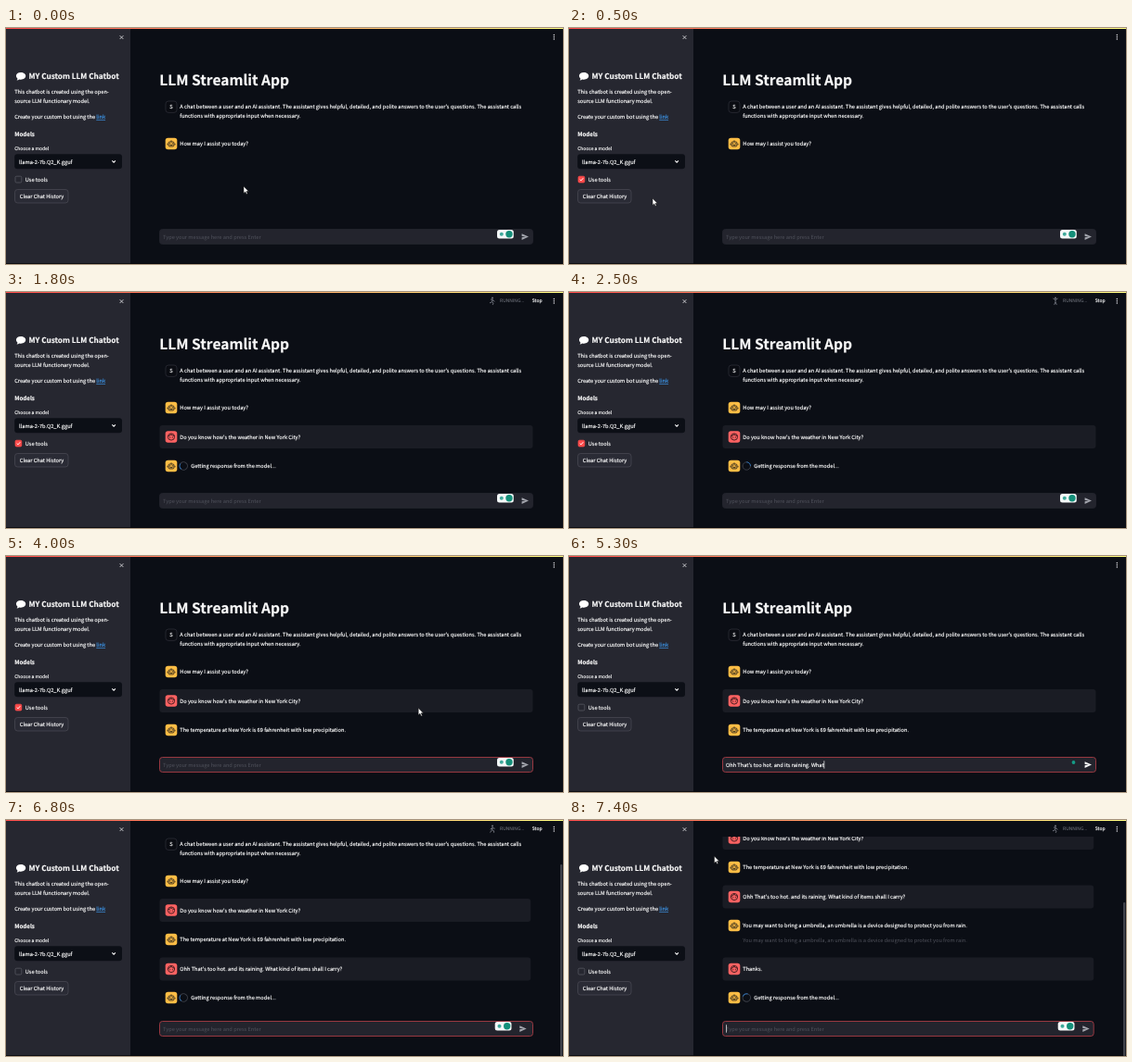
Write an HTML page that moves like this. It is 600 px wide and 255 px high and loops after 7.5 s.

```html
<!DOCTYPE html>
<html lang="en">
<head>
<meta charset="utf-8">
<title>Chatbot demo</title>
<style>
html, body { margin: 0; width: 100%; height: 100%; overflow: hidden; background: #0b0e15; }
svg { display: block; width: 600px; height: 255px; }
text {
  font: 5.67px "Noto Sans CJK JP", "Noto Sans CJK SC", "Noto Sans CJK", "Noto Sans", sans-serif;
  color: #fafafa;
  fill: currentColor;
  stroke: currentColor;
  stroke-width: .16px;
  text-rendering: geometricPrecision;
  white-space: pre;
}
.small { font-size: 4.97px; }
.bold { font-weight: 700; }
.dim { color: #50525c; stroke: none; }
.run { color: #7d808a; stroke: none; }
.link { color: #3d94e6; fill: currentColor; stroke: currentColor; text-decoration: underline; }
</style>
</head>
<body>
<svg viewBox="0 0 600 255">
  <defs>
    <linearGradient id="strip">
      <stop offset="0" stop-color="#ff4b4b"/>
      <stop offset="1" stop-color="#fffd80"/>
    </linearGradient>
    <clipPath id="view"><rect x="134" y="18" width="466" height="190"/></clipPath>
    <g id="bot">
      <rect x="-6.3" y="-6.3" width="12.6" height="12.6" rx="2.8" fill="#ffbd45"/>
      <g fill="none" stroke="#2c2619" stroke-width=".9">
        <rect x="-2.9" y="-2" width="5.8" height="4.9" rx="1"/>
        <path d="M0 -2V-3.6M-4 -.2V1.4M4 -.2V1.4M-1.5 1.6H1.5"/>
      </g>
      <path d="M-1.8 -.7h1.1v1.1h-1.1zM.7 -.7h1.1v1.1H.7z" fill="#2c2619"/>
    </g>
    <g id="user">
      <rect x="-6.3" y="-6.3" width="12.6" height="12.6" rx="2.8" fill="#ff6262"/>
      <circle r="3.6" fill="none" stroke="#35181b" stroke-width=".9"/>
      <path d="M-3.5 -.7Q-.8 -.8 -.2 -2.9Q1 -.9 3.5 -.9" fill="none" stroke="#35181b" stroke-width=".9"/>
      <path d="M-1.8 .3h1v1h-1zM.8 .3h1v1h-1z" fill="#35181b"/>
    </g>
  </defs>

  <rect width="600" height="255" fill="#0b0e15"/>
  <g clip-path="url(#view)"><g id="chat"></g></g>
  <g id="input"></g>

  <rect width="134" height="255" fill="#262730"/>
  <path d="M122.6 8.2l3.8 3.8m0 -3.8l-3.8 3.8" stroke="#e4e4e8" stroke-width=".8"/>
  <path d="M16 48c3 0 5.2 1.7 5.2 3.8S19 55.7 16 55.7q-.9 0 -1.7 -.2Q13.3 56.5 11.6 56.6Q12.5 55.7 12.4 54.6Q10.9 53.5 10.9 51.8C10.9 49.7 13 48 16 48Z" fill="#fff"/>
  <text x="24.5" y="55" class="bold" style="font-size:8.22px">MY Custom LLM Chatbot</text>
  <text x="9.2" y="71.2">This chatbot is created using the open-</text>
  <text x="9.2" y="81.2">source LLM functionary model.</text>
  <text x="9.2" y="98">Create your custom bot using the <tspan class="link">link</tspan></text>
  <text x="9.2" y="117.2" class="bold" style="font-size:6.2px">Models</text>
  <text x="9.2" y="131.6" class="small">Choose a model</text>
  <rect x="9.2" y="136.3" width="115.8" height="16" rx="3" fill="#0c0f16"/>
  <text x="14" y="146.6">llama-2-7b.Q2_K.gguf</text>
  <path d="M114.3 143.4l1.8 1.8 1.8 -1.8" fill="none" stroke="#fafafa" stroke-width="1.1"/>
  <g id="check"></g>
  <text x="20.7" y="165.6">Use tools</text>
  <rect x="9.5" y="174.5" width="57.5" height="14.5" rx="3" fill="#2a2b35" stroke="#4c4d56" stroke-width=".7"/>
  <text x="14.8" y="184">Clear Chat History</text>

  <rect width="600" height="1" fill="url(#strip)"/>
  <g fill="#e4e4e8"><circle cx="590.3" cy="7.5" r=".75"/><circle cx="590.3" cy="9.8" r=".75"/><circle cx="590.3" cy="12.1" r=".75"/></g>
  <g id="status"></g>
  <rect y="254.2" width="600" height=".8" fill="#05070b"/>
  <g id="bar"></g>
  <path id="cursor" d="M0 0V7.5L1.8 5.9 3 8.6 4.2 8.1 3 5.5H5.3Z" fill="#fff" stroke="#111" stroke-width=".5"/>
</svg>
<script>
const STEP = 100, LOOP = 7500;
const ask = "Do you know how's the weather in New York City?";
const follow = "Ohh That's too hot. and its raining. What kind of items shall I carry?";
const advice = "You may want to bring a umbrella, an umbrella is a device designed to protect you from rain.";
const answer = "The temperature at New York is 69 fahrenheit with low precipitation.";
const waiting = "Getting response from the model...";

// Typing spans: first step, last step, characters at each end
const typing = [
  [ask, 10, 16, 5, 47],
  [follow, 48, 57, 3, 71],
  ["Thanks.", 70, 71, 3, 7]
];

// Pointer positions per step; the pointer is hidden outside these runs
const paths = [
  [0, [[256, 171], [150, 168], [45, 164], [13, 162], [13, 162], [90, 184], [210, 216], [240, 222]]],
  [38, [[470, 140], [455, 155], [444.2, 164.3], [300, 165], [120, 163], [13, 162], [13, 162], [110, 190], [240, 222]]],
  [73, [[120, 75], [156.5, 39]]]
];

const poses = [
  "M0 -1.5L-.5 1.2L-2.5 4M-.5 1.2L1.6 2.2V4.2M0 -1L2.6 -.2M0 -1L-2.4 .6",
  "M0 -1.5V1.3L-1.3 4.3M0 1.3L1.3 4.3M0 -1L2.6 -2.6M0 -1L-2.6 -2.6",
  "M.3 -1.5L-.4 1.2L-3 2.3M-.4 1.2L1 2.6L.2 4.4M0 -1L2.4 .8M0 -1L-2 -1.6",
  "M0 -1.5V1.3L-2 3L-1.6 4.4M0 1.3L2 4.2M0 -1L-2 .8M0 -1L2 .8"
];

const el = id => document.getElementById(id);
const within = (n, a, b) => n >= a && n <= b;
const label = (x, y, s, attrs = "") => `<text x="${x}" y="${y}" ${attrs}>${s}</text>`;
const icon = (kind, y) => `<use href="#${kind}" x="178" y="${y}"/>`;

function typed(n) {
  const run = typing.find(r => within(n, r[1], r[2]));
  if (!run) return "";
  const [s, a, b, from, to] = run;
  return s.slice(0, Math.round(from + (to - from) * (n - a) / (b - a)));
}

function botLine(y, s) {
  return icon("bot", y) + label(187.3, y + 2, s);
}

function userLine(y, s, right) {
  return `<rect x="165.5" y="${y - 12.5}" width="${right - 165.5}" height="25" rx="3" fill="#1a1c24"/>`
    + icon("user", y) + label(187.3, y + 2, s);
}

function spinner(y, n) {
  return icon("bot", y)
    + `<g transform="translate(191.3 ${y}) rotate(${n * 72 % 360})" fill="none" stroke-width="1">`
    + `<circle r="4.2" stroke="#3a3d46"/><path d="M0 -4.2A4.2 4.2 0 0 1 4.2 0" stroke="#2a6cb0"/></g>`
    + label(199.3, y + 2, waiting);
}

function chat(n, right) {
  let s = label(165.3, 62.3, "LLM Streamlit App", 'class="bold" style="font-size:15.55px"')
    + '<rect x="172" y="79" width="12" height="12.4" rx="3" fill="#0a0c12" stroke="#30323b" stroke-width=".7"/>'
    + label(178, 87.3, "S", 'text-anchor="middle"')
    + label(187.3, 86.5, "A chat between a user and an AI assistant. The assistant gives helpful, detailed, and polite answers to the user's questions. The assistant calls")
    + label(187.3, 96.5, "functions with appropriate input when necessary.")
    + botLine(125, "How may I assist you today?");
  if (n >= 17) s += userLine(156.5, ask, right);
  if (within(n, 18, 34)) s += spinner(188, n);
  if (n >= 35) s += botLine(188, answer);
  if (n >= 58) s += userLine(220, follow, right);
  if (within(n, 58, 68)) s += spinner(251, n);
  if (n >= 69) s += botLine(251, advice);
  if (n >= 72) {
    s += label(187.3, 269, advice, 'class="dim"')
      + userLine(298, "Thanks.", right) + spinner(329, n);
  }
  return s;
}

function input(n, right) {
  const value = typed(n);
  const focus = within(n, 8, 16) || within(n, 40, 42) || within(n, 47, 74);
  const small = within(n, 8, 16) || within(n, 47, 57) || within(n, 70, 71);
  const caret = value || n === 8 || n === 9 || n === 47 || n === 74;
  const shift = n >= 58 ? -2.3 : 0;
  const badge = small
    ? '<circle cx="543.5" cy="223" r="1.9" fill="#159b86"/>'
    : '<rect x="529" y="218" width="17.8" height="9.6" rx="2.5" fill="#f4f8f8"/>'
      + '<circle cx="533.8" cy="222.8" r="2" fill="#3fa99b"/><circle cx="542" cy="222.8" r="3.7" fill="#148f79"/>';
  el("input").innerHTML =
    '<rect x="134" y="208" width="466" height="47" fill="#0b0e15"/>'
    + `<rect x="165.5" y="217.5" width="${right - 165.5}" height="16" rx="3" fill="#23242d" stroke="${focus ? "#a83c45" : "#23242d"}" stroke-width=".9"/>`
    + label(169, 227.5, value || "Type your message here and press Enter", value ? 'id="value"' : 'class="dim"')
    + `<g transform="translate(${shift})">${badge}`
    + `<path d="M555.6 222.3L563 225.6L555.6 228.9V226.3L560 225.6L555.6 224.9Z" fill="${value ? "#fafafa" : "#a3a5ad"}"/></g>`;
  if (caret) {
    const x = 169 + (value ? el("value").getComputedTextLength() : 0);
    el("input").insertAdjacentHTML("beforeend", `<rect x="${x}" y="221.3" width=".7" height="8.4" fill="#fafafa"/>`);
  }
}

function status(n) {
  const on = within(n, 3, 4) || within(n, 17, 34) || n === 44 || within(n, 58, 68) || n >= 72;
  if (!on) return "";
  return '<g transform="translate(524 9.5)" stroke="#858892" stroke-width=".8" fill="none">'
    + `<circle cy="-3" r=".9" fill="#858892" stroke="none"/><path d="${poses[n % 4]}"/></g>`
    + label(532, 11.3, "RUNNING...", 'class="small run"')
    + label(566.8, 11.3, "Stop", 'class="small"');
}

function checkbox(on) {
  return `<rect x="10" y="160.2" width="6.8" height="6.8" rx="1.3" fill="${on ? "#ff4b4b" : "#262730"}" stroke="${on ? "#ff4b4b" : "#5d5f68"}" stroke-width=".7"/>`
    + (on ? '<path d="M11.7 163.6l1.3 1.3 2.3 -2.7" fill="none" stroke="#fff" stroke-width=".9"/>' : "");
}

function pointer(n) {
  const run = paths.find(([start, pts]) => within(n, start, start + pts.length - 1));
  const c = el("cursor");
  c.style.display = run ? "" : "none";
  if (run) c.setAttribute("transform", `translate(${run[1][n - run[0]]})`);
}

function scrollbar(scroll) {
  if (!scroll) return "";
  const total = 255 + scroll;
  return `<rect x="597" y="${255 * scroll / total}" width="2.3" height="${255 * 255 / total}" rx="1" fill="#41434b"/>`;
}

function draw(n) {
  const scroll = n >= 72 ? 137 : n >= 58 ? 59 : 0;
  const right = scroll ? 565.2 : 567.5;
  el("chat").setAttribute("transform", `translate(0 ${-scroll})`);
  el("chat").innerHTML = chat(n, right);
  input(n, within(n, 58, 68) ? 567.5 : right);
  el("check").innerHTML = checkbox(within(n, 3, 43));
  el("status").innerHTML = status(n);
  el("bar").innerHTML = scrollbar(scroll);
  pointer(n);
}

let shown = -1;
function tick() {
  const n = Math.floor(performance.now() % LOOP / STEP);
  if (n !== shown) draw(shown = n);
  requestAnimationFrame(tick);
}
tick();
</script>
</body>
</html>
```
